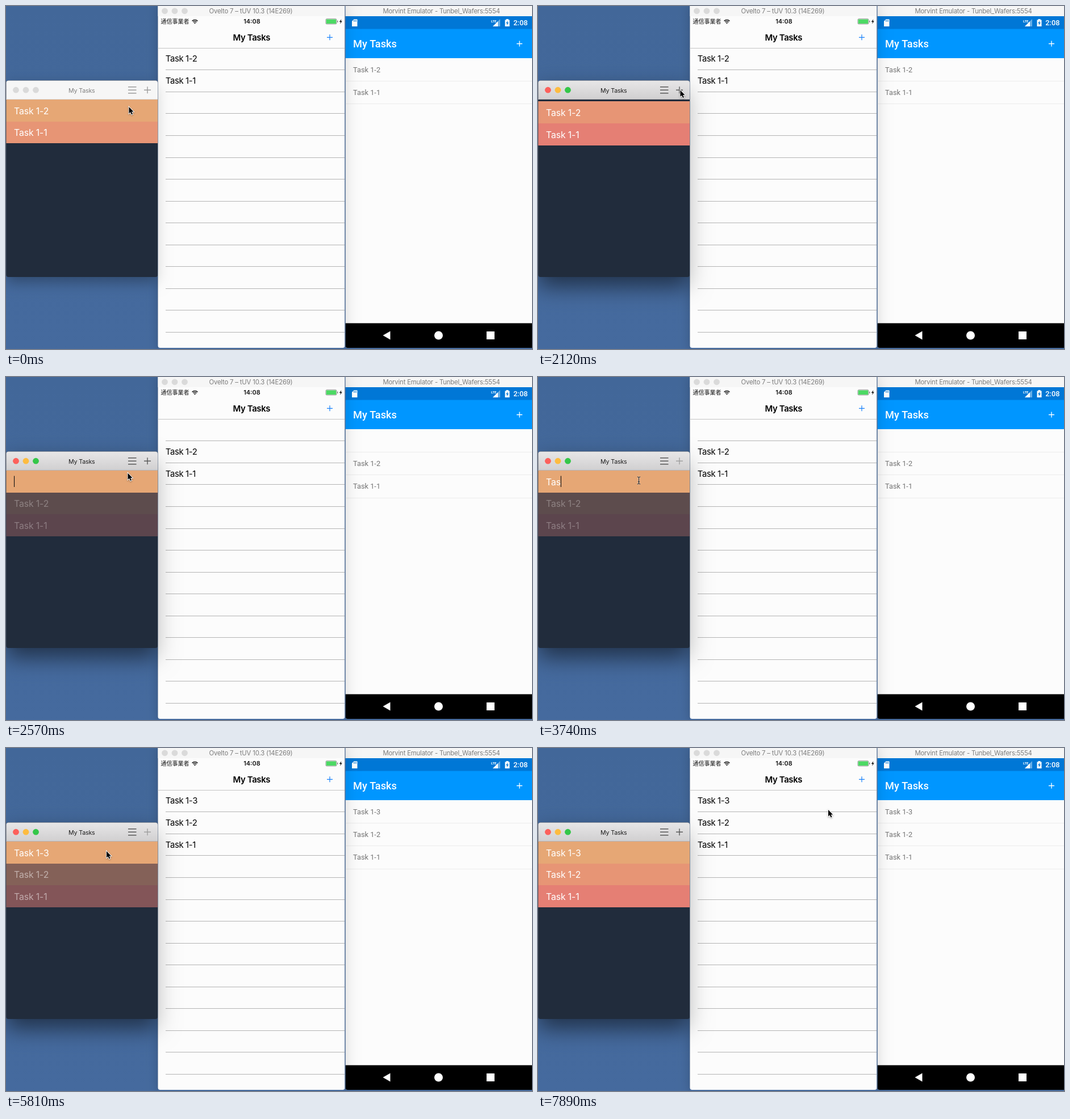
Recreate the animation shown at these times as an HTML page with a canvas. Size 926 px wide and 605 px high, loop 8000 ms.

```html
<!DOCTYPE html>
<html lang="en">
<head>
<meta charset="utf-8">
<title>Synced task list</title>
<style>
html, body { margin: 0; width: 100%; height: 100%; overflow: hidden; background: #43689b; }
canvas { display: block; }
</style>
</head>
<body>
<canvas id="stage" width="926" height="605"></canvas>
<script>
const ctx = document.getElementById('stage').getContext('2d');
const LOOP = 8000;
const ROW = 38.55;
const SANS = 'Inter, "Open Sans", sans-serif';
const ROBOTO = 'Roboto, "Noto Sans", sans-serif';
const CJK = '"Noto Sans CJK JP", "Noto Sans CJK", sans-serif';
const ROW_COLORS = ['#e6a775', '#e79575', '#e57f74'];
const ROW_TEXT = { size: 15.8, tracking: -0.007 };

// Each step holds until the next one and changes only what it lists.
const steps = [
  { at: 0, x: 216.5, y: 178, active: false, gap: 0, dim: 1, typed: '', editing: false,
    caret: false, beam: false, plusOff: false, synced: 0 },
  { at: 590, x: 228, y: 165 },
  { at: 740, x: 245, y: 150 },
  { at: 920, x: 250.5, y: 148.5 },
  { at: 2120, active: true, editing: true, gap: 0.09 },
  { at: 2270, gap: 0.55, dim: 0.75 },
  { at: 2420, x: 243, y: 154, gap: 1, dim: 0.4, synced: 1, caret: true },
  { at: 2570, x: 214.5, y: 169.5, dim: 0.3 },
  { at: 2710, x: 193, y: 178, beam: true, plusOff: true },
  { at: 2850, x: 180, y: 182 },
  { at: 3000, x: 177.5, y: 182.5 },
  { at: 3450, typed: 'T' },
  { at: 3600, typed: 'Ta' },
  { at: 3740, typed: 'Tas' },
  { at: 3890, typed: 'Task' },
  { at: 4190, typed: 'Task ' },
  { at: 4480, typed: 'Task 1' },
  { at: 4930, typed: 'Task 1-' },
  { at: 5220, typed: 'Task 1-3' },
  { at: 5670, caret: false, dim: 0.35 },
  { at: 5810, beam: false, x: 177, y: 182, dim: 0.5, synced: 2 },
  { at: 5960, dim: 0.8 },
  { at: 6110, dim: 1, plusOff: false },
  { at: 6550, x: 236, y: 161 },
  { at: 6690, x: 403, y: 104 },
  { at: 6840, x: 459.5, y: 94 },
  { at: 7740, x: 495, y: 107 },
  { at: 7890, x: 511, y: 109 }
];

function stateAt(time) {
  return Object.assign({}, ...steps.filter(step => step.at <= time));
}

function rect(x, y, w, h, color) {
  ctx.fillStyle = color;
  ctx.fillRect(x, y, w, h);
}

function disc(x, y, r, color) {
  ctx.fillStyle = color;
  ctx.beginPath();
  ctx.arc(x, y, r, 0, Math.PI * 2);
  ctx.fill();
}

function shape(points, color) {
  ctx.beginPath();
  points.forEach(([x, y]) => ctx.lineTo(x, y));
  ctx.closePath();
  ctx.fillStyle = color;
  ctx.fill();
}

function line(x1, y1, x2, y2, color, width = 1) {
  ctx.strokeStyle = color;
  ctx.lineWidth = width;
  ctx.beginPath();
  ctx.moveTo(x1, y1);
  ctx.lineTo(x2, y2);
  ctx.stroke();
}

function plus(x, y, r, color, width) {
  line(x - r, y, x + r, y, color, width);
  line(x, y - r, x, y + r, color, width);
}

function setFont(size, family, weight, tracking) {
  ctx.font = `${weight} ${size}px ${family}`;
  ctx.letterSpacing = `${tracking * size}px`;
}

function text(str, x, y, color, size,
    { family = SANS, weight = 400, align = 'left', tracking = 0 } = {}) {
  setFont(size, family, weight, tracking);
  ctx.textAlign = align;
  ctx.fillStyle = color;
  ctx.fillText(str, x, y);
}

function roundPath(x, y, w, h, radii) {
  ctx.beginPath();
  ctx.roundRect(x, y, w, h, radii);
}

function clipped(path, draw) {
  ctx.save();
  path();
  ctx.clip();
  draw();
  ctx.restore();
}

// Shadow of a window, limited to one vertical band of the screen.
function shadow(box, left, right, alpha, blur, drop) {
  clipped(() => roundPath(left, 0, right - left, 605, 0), () => {
    ctx.shadowColor = `rgba(0,0,0,${alpha})`;
    ctx.shadowBlur = blur;
    ctx.shadowOffsetY = drop;
    ctx.fillStyle = '#444';
    roundPath(...box);
    ctx.fill();
  });
}

function bolt(x, y, color) {
  shape([[x + 1.2, y - 4.4], [x - 2.5, y + 0.6], [x - 0.2, y + 0.6],
    [x - 1.2, y + 4.4], [x + 2.5, y - 0.8], [x + 0.2, y - 0.8]], color);
}

function deviceTitle(str, x, left, width) {
  rect(left, 0, width, 18, '#f6f6f6');
  text(str, x, 13, '#7d7d7d', 11.4, { align: 'center', tracking: -0.018 });
}

function drawDesktop() {
  const sky = ctx.createLinearGradient(0, 0, 0, 605);
  sky.addColorStop(0, '#426799');
  sky.addColorStop(1, '#456a9e');
  rect(0, 0, 926, 605, sky);
}

function taskNames(state) {
  const old = ['Task 1-2', 'Task 1-1'];
  return [old, ['', ...old], ['Task 1-3', ...old]][state.synced];
}

function drawTablet(state) {
  clipped(() => roundPath(597.5, -5, 334, 608, [0, 0, 0, 4]), () => {
    rect(597, 0, 329, 605, '#fcfcfc');
    deviceTitle('Morvint Emulator - Tunbel_Wafers:5554', 766.5, 597, 329);
    rect(597, 18, 329, 23, '#0077d6');
    rect(597, 40.5, 329, 51.5, '#0096ff');
    shape([[612.5, 23.5], [618.5, 23.5], [618.5, 36], [609, 36], [609, 27]], '#fff');
    for (let i = 0; i < 3; i++) rect(612 + i * 2, 25, 1, 2.5, '#0077d6');
    text('LTE', 854, 29, '#fff', 6, { family: ROBOTO, weight: 700, tracking: -0.03 });
    shape([[870, 23], [870, 36], [857, 36]], '#66ade6');
    shape([[866, 27], [866, 36], [857, 36]], '#fff');
    rect(878.5, 24.5, 8, 11.5, '#fff');
    rect(880.5, 23, 4, 2, '#fff');
    bolt(882.5, 30, '#0077d6');
    text('2:08', 918.5, 34, '#fff', 12.8, { family: ROBOTO, weight: 500, align: 'right' });
    text('My Tasks', 611, 73, '#fff', 18.2, { family: ROBOTO, weight: 500 });
    plus(904, 66.5, 5, '#fff', 1.3);
    taskNames(state).forEach((name, i) => {
      const top = 92 + i * 40.3;
      text(name, 611, top + 24.6, '#747474', 12.8, { family: ROBOTO });
      rect(597, Math.round(top + 40), 329, 1, '#ececec');
    });
    rect(597, 559.5, 329, 46, '#000');
    shape([[663.5, 581], [676.5, 573.5], [676.5, 588.5]], '#fff');
    disc(761.5, 581, 7.5, '#fff');
    rect(846, 574, 14, 14, '#fff');
  });
}

function drawWifi(x, y) {
  ctx.strokeStyle = '#111';
  ctx.lineWidth = 1.5;
  for (const r of [4.2, 7]) {
    ctx.beginPath();
    ctx.arc(x, y, r, -Math.PI * 0.75, -Math.PI * 0.25);
    ctx.stroke();
  }
  shape([[x, y], [x - 1.7, y - 1.9], [x, y - 2.6], [x + 1.7, y - 1.9]], '#111');
}

function drawPhone(state) {
  const box = [267.5, -5, 329, 608, [0, 0, 4, 4]];
  shadow(box, 0, 267.5, 0.2, 18, 4);
  shadow(box, 597, 926, 0.16, 26, 4);
  clipped(() => roundPath(...box), () => {
    rect(267, 0, 330, 605, '#fcfcfc');
    deviceTitle('Ovelto 7 – tUV 10.3 (14E269)', 431, 267, 330);
    [279.5, 297, 314.5].forEach(x => disc(x, 8.8, 5.4, '#dadada'));
    text('通信事業者', 272.5, 31, '#111', 10, { family: CJK });
    drawWifi(332.5, 31.5);
    text('14:08', 433, 31.3, '#111', 10.9, { weight: 600, align: 'center' });
    ctx.strokeStyle = '#777';
    ctx.lineWidth = 0.8;
    roundPath(563, 22.7, 19, 9.2, 1.8);
    ctx.stroke();
    rect(563.8, 23.5, 17.4, 7.6, '#4cd964');
    rect(583.2, 25.8, 1.2, 3, '#777');
    bolt(589.3, 27.3, '#111');
    text('My Tasks', 432.3, 60.5, '#000', 14.9,
      { weight: 600, align: 'center', tracking: -0.024 });
    plus(570, 55.3, 5, '#1680fa', 1.2);
    rect(267, 74, 330, 1, '#c4c4c4');
    for (let i = 0; i < 13; i++) {
      rect(281, Math.round(112.3 + i * ROW), 316, 1, '#b4b4b4');
    }
    taskNames(state).forEach((name, i) => {
      text(name, 280.8, 98.4 + i * ROW, '#000', 14.9, { tracking: -0.024 });
    });
  });
  line(597, 0, 597, 602, '#48648c', 1);
}

function drawRow(name, top, color) {
  const edge = Math.round(top);
  rect(0, edge, 268, Math.round(top + ROW) - edge, color);
  text(name, 14, top + 25.6, '#fff', ROW_TEXT.size, ROW_TEXT);
}

function drawTaskRows(state) {
  const top = 165;
  const gap = state.gap * ROW;
  const shift = state.editing ? 1 : 0;
  ctx.globalAlpha = state.dim;
  ['Task 1-2', 'Task 1-1'].forEach((name, i) => {
    drawRow(name, top + gap + i * ROW, ROW_COLORS[i + shift]);
  });
  ctx.globalAlpha = 1;
  if (state.gap < 0.2) return;
  clipped(() => roundPath(0, top, 268, Math.round(gap), 0), () => {
    drawRow(state.typed, top, ROW_COLORS[0]);
  });
  if (state.caret) {
    setFont(ROW_TEXT.size, SANS, 400, ROW_TEXT.tracking);
    rect(14 + ctx.measureText(state.typed).width, 174.5, 1.1, 19.5, '#111');
  }
}

function drawTaskWindow(state) {
  const box = [0.5, 131.5, 266.5, 346.5, 4];
  const { active } = state;
  const [blur, drop] = active ? [38, 17] : [24, 9];
  shadow(box, 0, 267.5, active ? 0.52 : 0.3, blur, drop);
  shadow(box, 267.5, 597, active ? 0.26 : 0.15, blur, drop);
  clipped(() => roundPath(...box), () => {
    rect(0, 131, 268, 348, '#212c3c');
    const bar = ctx.createLinearGradient(0, 132, 0, 165);
    bar.addColorStop(0, active ? '#e7e6e7' : '#f6f6f6');
    bar.addColorStop(1, active ? '#d0cfd0' : '#f6f6f6');
    rect(0, 131, 268, 34, bar);
    rect(0, 164, 268, 1, active ? '#b4b2b4' : '#dcdcdc');
    const lights = active ? ['#fc605b', '#fdbc40', '#34c749'] : Array(3).fill('#dadada');
    lights.forEach((color, i) => disc(17.5 + i * 17.5, 148.2, 5.4, color));
    text('My Tasks', 133.3, 152.5, active ? '#1c1c1c' : '#7f7f7f', 10.7,
      { align: 'center', tracking: -0.018 });
    const ink = active ? '#5a5a5a' : '#9c9c9c';
    [142.7, 148.2, 153.7].forEach(y => line(215, y, 229.5, y, ink, 1.4));
    plus(249, 148.2, 6, state.plusOff ? '#a0a0a0' : ink, 1.4);
    drawTaskRows(state);
  });
}

function drawArrow() {
  const outline = [[0, 0], [0, 11.6], [2.6, 9.3], [4.6, 13.6], [6.5, 12.7],
    [4.6, 8.6], [8.1, 8.4]];
  ctx.beginPath();
  outline.forEach(([x, y]) => ctx.lineTo(x, y));
  ctx.closePath();
  ctx.shadowColor = 'rgba(0,0,0,0.35)';
  ctx.shadowBlur = 2.5;
  ctx.shadowOffsetY = 1;
  ctx.lineWidth = 1.8;
  ctx.strokeStyle = '#fff';
  ctx.stroke();
  ctx.shadowColor = 'transparent';
  ctx.fillStyle = '#000';
  ctx.fill();
}

function drawBeam() {
  for (const [color, width] of [['rgba(255,255,255,0.5)', 2.4], ['#222', 1.1]]) {
    line(0, -5.5, 0, 5.5, color, width);
    for (const side of [-1, 1]) {
      line(0, -5.5, side * 2.6, -6.5, color, width);
      line(0, 5.5, side * 2.6, 6.5, color, width);
    }
    line(-1.5, 2.3, 1.5, 2.3, color, width);
  }
}

function drawPointer({ x, y, beam }) {
  ctx.save();
  ctx.translate(x, y);
  if (beam) drawBeam();
  else drawArrow();
  ctx.restore();
}

function render(now) {
  const state = stateAt(now % LOOP);
  drawDesktop();
  drawTablet(state);
  drawPhone(state);
  drawTaskWindow(state);
  drawPointer(state);
  requestAnimationFrame(render);
}

requestAnimationFrame(render);
</script>
</body>
</html>
```
